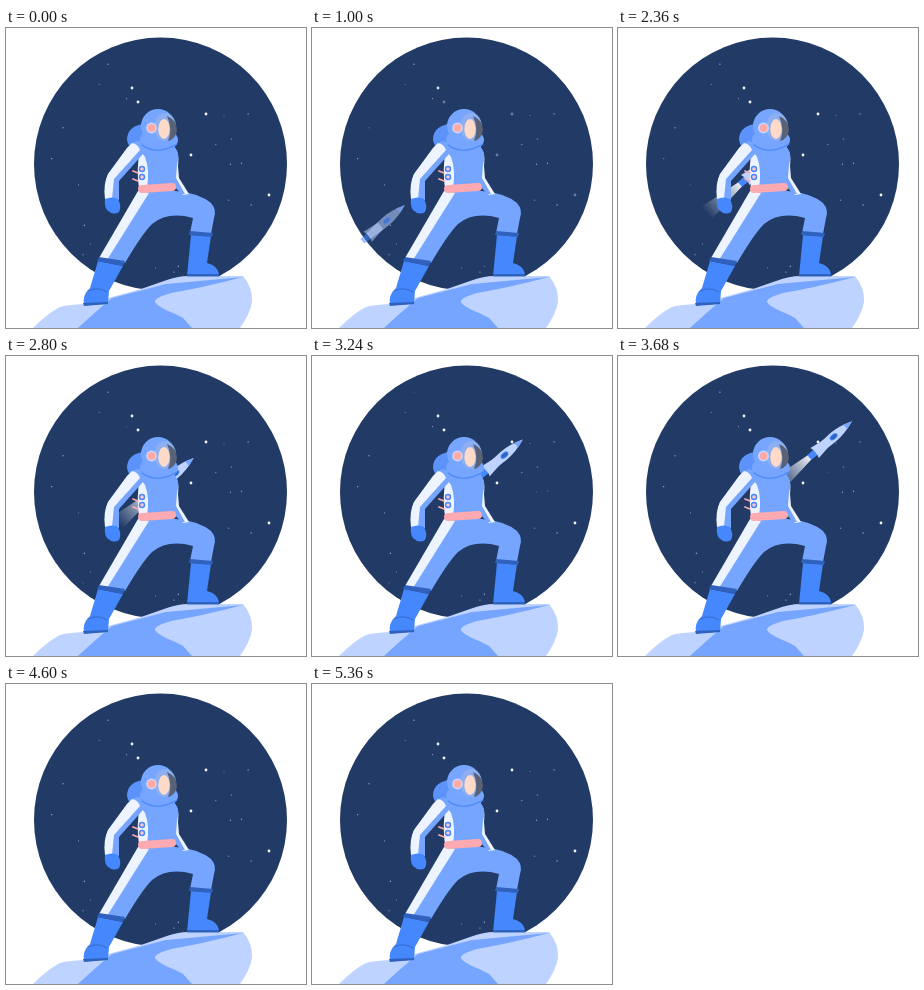
Recreate the animation shown at these times as an HTML page with a canvas. Size 300 by 300 pixels, loop 5440 ms.

```html
<!DOCTYPE html>
<html lang="en">
<head>
<meta charset="utf-8">
<title>Astronaut</title>
<style>
html, body { margin: 0; width: 100%; height: 100%; overflow: hidden; background: #fff; }
canvas { display: block; width: 300px; height: 300px; }
</style>
</head>
<body>
<canvas id="stage"></canvas>
<script>
const canvas = document.getElementById('stage');
const ratio = Math.max(1, window.devicePixelRatio || 1);
canvas.width = canvas.height = 300 * ratio;
const ctx = canvas.getContext('2d');
ctx.scale(ratio, ratio);

const LOOP = 5440, STEP = 40;
const SKY = { x: 154.5, y: 136, r: 126.5 };
const NAVY = '#213a66', BLUE = '#75a5ff', BRIGHT = '#4587fd', DARK = '#2f62bd',
  WHITE = '#eef4ff', PALE = '#bed3ff', PINK = '#ffa9b0', SKIN = '#ffdac8';

const clamp = v => Math.max(0, Math.min(1, v));
const ramp = (t, a, b) => clamp((t - a) / (b - a));
const smooth = v => v * v * (3 - 2 * v);
const pulse = (t, middle) => smooth(clamp(1 - Math.abs(t - middle) / 440));

function seeded(seed) {
  return () => (seed = seed * 16807 % 2147483647) / 2147483647;
}

function makeStars() {
  const rand = seeded(71);
  const bright = [[126, 60], [132, 74], [200, 86], [185, 127], [263, 167]]
    .map(([x, y], i) => ({ x, y, r: 1.4, alpha: .95, dip: i ? .65 : .1, times: [1000, 4120] }));
  const faint = Array.from({ length: 26 }, () => {
    const angle = rand() * Math.PI * 2, reach = SKY.r * .95 * Math.sqrt(rand());
    return {
      x: SKY.x + reach * Math.cos(angle), y: SKY.y + reach * Math.sin(angle),
      r: .5 + .25 * rand(), alpha: .35 + .35 * rand(), dip: rand(),
      times: [960 + 3960 * rand()]
    };
  });
  return [...bright, ...faint];
}
const stars = makeStars();

function dot(x, y, r, fill) {
  ctx.beginPath();
  ctx.arc(x, y, r, 0, Math.PI * 2);
  ctx.fillStyle = fill;
  ctx.fill();
}

function oval(x, y, rx, ry, fill) {
  ctx.beginPath();
  ctx.ellipse(x, y, rx, ry, 0, 0, Math.PI * 2);
  ctx.fillStyle = fill;
  ctx.fill();
}

function shape(d, fill) {
  ctx.fillStyle = fill;
  ctx.fill(new Path2D(d));
}

function line(d, color, width) {
  ctx.strokeStyle = color;
  ctx.lineWidth = width;
  ctx.lineCap = 'round';
  ctx.stroke(new Path2D(d));
}

function drawSky(t) {
  dot(SKY.x, SKY.y, SKY.r, NAVY);
  for (const s of stars) {
    const dim = Math.max(...s.times.map(c => pulse(t, c)));
    ctx.globalAlpha = s.alpha * (1 - s.dip * dim);
    dot(s.x, s.y, s.r, '#fff');
  }
  ctx.globalAlpha = 1;
}

// A falling star whose line grows, then is eaten from behind
function drawStreak(t, x, y, middle) {
  const head = smooth(ramp(t, middle - 240, middle));
  const tail = smooth(ramp(t, middle, middle + 280));
  if (head <= tail) return;
  const at = p => [x - 34 * p, y + 34 * p];
  const a = at(tail), b = at(head), m = at((head + tail * 2) / 3);
  shape(`M${a}L${m[0] - .7} ${m[1] - .7}L${b}L${m[0] + .7} ${m[1] + .7}Z`, '#d5e0e6');
}

function drawRocket(t) {
  const alpha = ramp(t, 640, 1320) * (1 - ramp(t, 4240, 4600));
  if (!alpha) return;
  const dt = t - 1000;
  ctx.save();
  ctx.translate(93 + .0526 * dt, 177 - .0417 * dt);
  ctx.rotate(-.705);
  ctx.globalAlpha = alpha;

  const burn = smooth(ramp(t, 840, 1400));
  if (burn) {
    const end = -54 - 46 * burn, w = 8 * burn;
    const g = ctx.createLinearGradient(-54, 0, end, 0);
    g.addColorStop(0, 'rgba(255,255,255,.95)');
    g.addColorStop(1, 'rgba(230,235,245,0)');
    shape(`M-53 -2.5L${end} ${-w}V${w}L-53 2.5Z`, g);
  }
  shape('M-46 -3.5L-56 -3V3L-46 3.5Z', BRIGHT);
  shape('M-32 -4L-49 -6.5L-47 0L-49 6.5L-32 4Z', PALE);
  shape('M0 0Q-13 -5 -25 -5Q-37 -5 -48 -3V3Q-37 5 -25 5Q-13 5 0 0Z', PALE);
  shape('M0 0L-9 -3Q-8 0 -9 3Z', BLUE);
  oval(-24, 0, 4.6, 2.7, BRIGHT);
  oval(-24, 0, 3.4, 1.8, DARK);
  ctx.restore();
}

function drawRock() {
  shape('M27 300Q42 285 54 279Q60 277 79 276L106 269L135 261L158 253Q172 248 182 248H237Q247 260 246 274Q244 286 234 300Z', PALE);
  shape('M72 300Q88 285 106 270L160 256L237 249Q195 260 165 265Q148 270 149 274C153 281 168 284 177 290L186 300Z', BLUE);
}

function drawLegs() {
  shape('M147 162L170 163Q193 165 205 175Q211 182 208 190L205 206L184 205L187 190Q162 183 146 196Q136 206 119 235L94 231L133 163Z', BLUE);
  shape('M132 163L143 165L101 232L93 230Z', WHITE);
  // boots and cuffs
  shape('M185 207L205 208L201 235Q212 238 213 246L212 248H181Z', BRIGHT);
  shape('M184 203L207 205L206 209L183 207Z', DARK);
  shape('M181 246H213V248.5H181Z', DARK);
  shape('M92 233L117 238L103 263L102 276L78 277Q76 267 84 260Z', BRIGHT);
  shape('M93 229L119 233L117 238L91 233Z', DARK);
  line('M82 263Q92 258 101 264', DARK, .8);
  shape('M77 275L102 274V276L78 278Z', DARK);
}

function drawTorso() {
  // pack and far arm
  shape('M136 96Q121 99 121 112Q122 120 132 123L142 119Z', '#5c93fa');
  shape('M166 118Q174 122 172 138L173 150L183 166L177 167L166 152Z', WHITE);
  shape('M166 117Q175 123 171 137L170 150L179 166L175 166L163 152Z', BLUE);

  shape('M138 115L168 117Q172 126 168 140L168 159L134 161Q130 145 135 129Z', BLUE);
  shape('M134 122L139 129Q144 142 141 160L133 160Q130 141 134 122Z', WHITE);
  for (const y of [141, 149]) {
    dot(136, y, 3.2, BRIGHT);
    dot(136, y, 1.8, '#ffc5cd');
    line(`M127 ${y + 2}l5 2`, PINK, 1.7);
  }
  line('M136 161L166 159', PINK, 8);
}

function drawArm() {
  shape('M132 113Q140 116 137 126L113 153V172L101 173Q97 156 102 146L122 119Q126 114 132 113Z', BLUE);
  shape('M126 115Q132 116 134 122L108 151L106 171H99Q97 156 102 146L121 120Z', WHITE);
  shape('M99 171Q106 168 112 171Q116 178 113 184Q107 188 101 182Q98 178 99 171Z', BRIGHT);
}

function drawHelmet() {
  oval(153, 112, 19, 12, BLUE);
  line('M136 117Q151 128 171 116', BRIGHT, 1.1);
  dot(152, 98, 17, '#76a6ff');
  oval(159, 99, 11, 14, '#8daef0');
  oval(158, 101, 5.7, 10, SKIN);
  shape('M161 88Q171 92 171 102Q170 111 162 113Q167 101 161 88Z', '#596174');
  dot(145.5, 100, 5.4, '#c9d9ff');
  dot(145.5, 100, 3.9, '#ffaaa7');
}

function draw(t) {
  ctx.fillStyle = '#fff';
  ctx.fillRect(0, 0, 300, 300);
  drawSky(t);
  drawStreak(t, 238, 137, 1640);
  drawStreak(t, 101, 174, 4120);
  drawRocket(t);
  drawRock();
  drawLegs();
  drawTorso();
  drawArm();
  drawHelmet();
}

const start = performance.now();
function tick(now) {
  const t = Math.max(0, now - start) % LOOP;
  draw(Math.floor(t / STEP) * STEP);
  requestAnimationFrame(tick);
}
draw(0);
requestAnimationFrame(tick);
</script>
</body>
</html>
```
